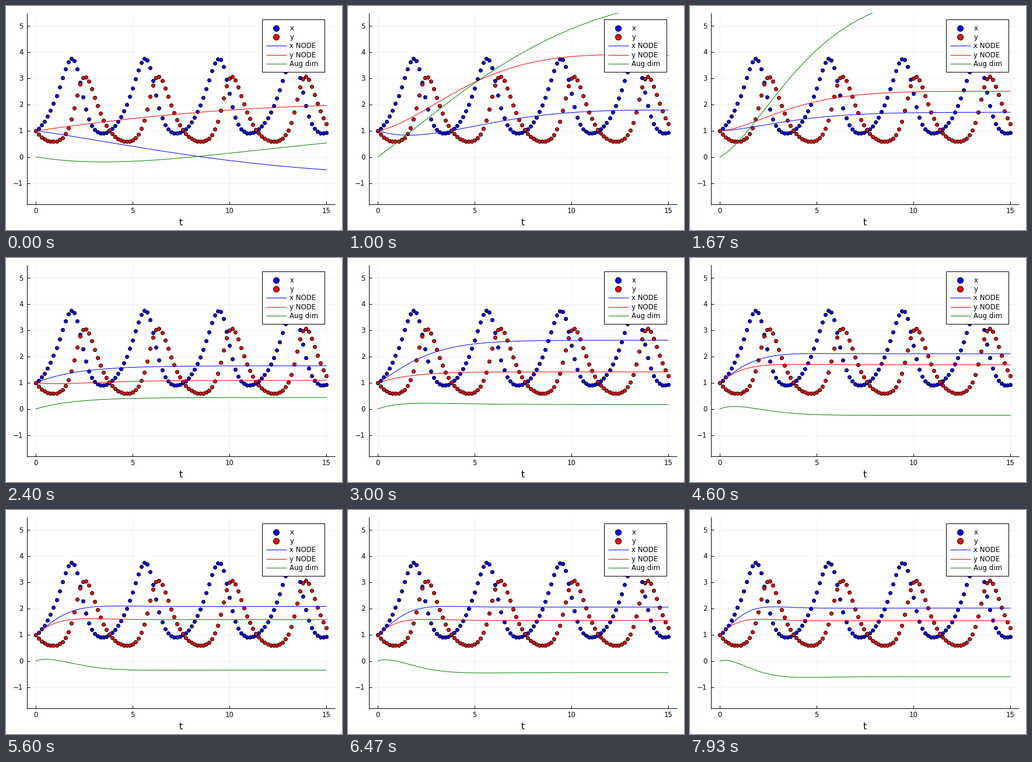
Animation of 576 by 384 pixels, one loop 8000 ms. Source, as a matplotlib script:

```python
import numpy as np
import matplotlib.pyplot as plt
from matplotlib.animation import FuncAnimation
from matplotlib.patches import Rectangle

W, H, DPI = 576, 384, 96
STEPS, LOOP_MS = 120, 8000
PX = 72 / DPI  # one pixel in points
START = (1, 1, 0)
COLORS = ("blue", "red", "green")
LABELS = ("x NODE", "y NODE", "Aug dim")
X, Y, AUG = range(3)
T = np.linspace(0, 15, 301)

# training step: swing, then (slope, end, rate) of x, y and the extra dimension
KEYS = {
    0: (1, (-.105, -.65, .1), (.1, 1.97, .1), (-.121, 1.05, .1)),
    15: (1, (-.24, 1.75, .24), (.13, 3.78, .24), (.55, 5.9, .12)),
    36: (.05, (.3, 1.645, .55), (-.09, 1.09, .6), (.22, .435, .55)),
    55: (.5, (.57, 2.13, .8), (.6, 1.775, .8), (.32, -.135, .7)),
    119: (1, (.55, 2.015, 1), (.72, 1.53, .92), (.2, -.61, .75)),
}

# passing overshoots of a curve's end: first step, last step, curve, height
HUMPS = [(0, 8, X, 7), (8, 15, X, -7), (15, 36, AUG, 3),
         (36, 55, X, .75), (55, 119, Y, -.09)]

key_steps = list(KEYS)
swings = [key[0] for key in KEYS.values()]
params = np.array([key[1:] for key in KEYS.values()])


def settle(start, slope, end, rate, swing):
    """Damped swing from start, with the given first slope, to end."""
    w, gap = rate * swing, start - end
    return end + np.exp(-rate * T) * (
        gap * np.cos(w * T) + (slope + rate * gap) / w * np.sin(w * T))


def model(step):
    swing = np.interp(step, key_steps, swings)
    for i, start in enumerate(START):
        slope, end, rate = (np.interp(step, key_steps, params[:, i, j])
                            for j in range(3))
        for a, b, which, height in HUMPS:
            if which == i and a < step < b:
                end += height * np.sin(np.pi * (step - a) / (b - a))**2
        yield settle(start, slope, end, rate, swing)


def predator_prey(n=100, sub=20):
    def rate(u):
        x, y = u
        return np.array([1.5 * x - x * y, x * y - 2 * y])

    u, h = np.array([1.0, 1.0]), 15 / (n - 1) / sub
    out = [u]
    for _ in range(n - 1):
        for _ in range(sub):
            k1 = rate(u)
            k2 = rate(u + h / 2 * k1)
            k3 = rate(u + h / 2 * k2)
            k4 = rate(u + h * k3)
            u = u + h / 6 * (k1 + 2 * k2 + 2 * k3 + k4)
        out.append(u)
    return np.linspace(0, 15, n), np.array(out).T


plt.rcParams["font.family"] = "DejaVu Sans"
fig = plt.figure(figsize=(W / DPI, H / DPI), dpi=DPI, facecolor="white")

# plot area
L, R, TOP, BOT = 36.4, 564, 11.6, 339.6
ax = fig.add_axes([L / W, 1 - BOT / H, (R - L) / W, (BOT - TOP) / H])
ax.set(xlim=(-.45, 15.45), ylim=(-1.8, 5.5))
ax.axis("off")

# pixel-based layer for axes, labels and legend
top = fig.add_axes([0, 0, 1, 1], zorder=5)
top.set(xlim=(0, W), ylim=(H, 0))
top.axis("off")


def stroke(xs, ys, color="black", **kw):
    top.plot(xs, ys, color=color, lw=PX, solid_capstyle="butt", **kw)


def label(x, y, text, size=11.8, **kw):
    top.text(x, y, text, fontsize=size * PX, **kw)


def dots(axes, x, y, color, size):
    axes.scatter(x, y, s=(size * PX)**2, fc=color, ec="black", lw=PX, zorder=2)


grid = dict(color="black", alpha=.07, lw=.75 * PX, zorder=0)
for v in range(0, 16, 5):
    ax.axvline(v, **grid)
    px = L + (v + .45) / 15.9 * (R - L)
    stroke([px, px], [BOT, BOT - 5])
    label(px, 355, str(v), ha="center")
for v in range(-1, 6):
    ax.axhline(v, **grid)
    py = BOT - (v + 1.8) / 7.3 * (BOT - TOP)
    stroke([L, L + 5], [py, py])
    label(29.5, py + 4.5, str(v).replace("-", "\u2212"), ha="right")
stroke([L, L], [TOP, BOT + 1])
stroke([L, R], [BOT, BOT])
label(300, 376, "t", 16, ha="center")

ts, data = predator_prey()
for series, color in zip(data, COLORS):
    dots(ax, ts, series, color, 6)
lines = [ax.plot([], [], color=c, lw=PX, zorder=3)[0] for c in COLORS]

# legend
top.add_patch(Rectangle((439.4, 23), 107, 90, fc="white", ec="black", lw=PX))
for i, name in enumerate(("x", "y") + LABELS):
    y = 37.9 + 15.2 * i
    label(486.5, y + 4.1, name)
    if i < 2:
        dots(top, 463, y, COLORS[i], 10)
    else:
        stroke([446, 481], [y, y], COLORS[i - 2], zorder=3)


def update(step):
    for line, ys in zip(lines, model(step)):
        line.set_data(T, ys)
    return lines


anim = FuncAnimation(fig, update, frames=STEPS, interval=LOOP_MS / STEPS,
                     repeat=True, repeat_delay=0, blit=False)
plt.show()
```
